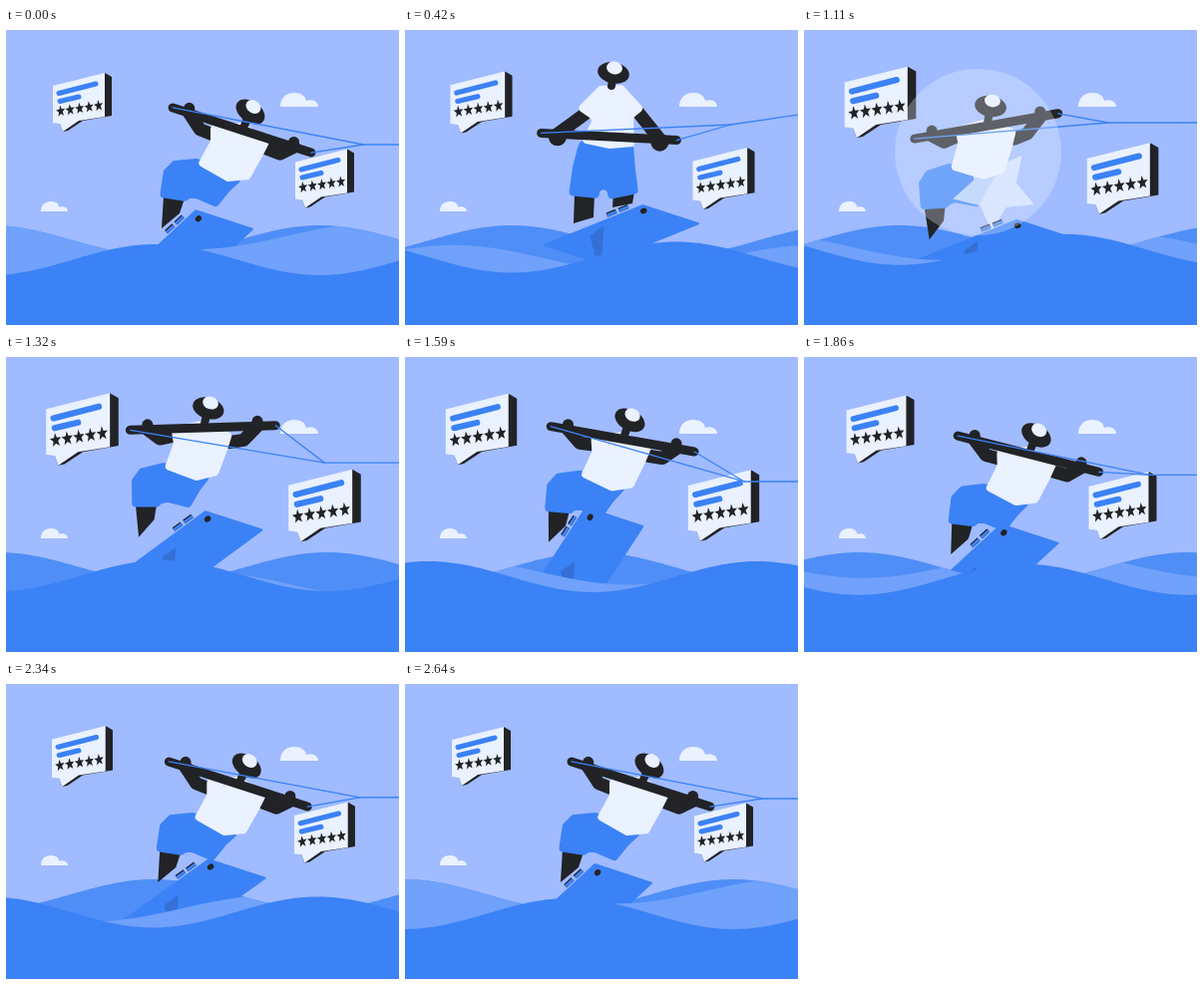
Write an HTML page with a canvas that moves like this. It is 394 px wide and 300 px high and loops after 2.67 s.

```html
<!DOCTYPE html>
<html lang="en">
<head>
<meta charset="utf-8">
<title>Wakeboarder</title>
<style>
html, body { margin: 0; width: 100%; height: 100%; overflow: hidden; background: #fff; }
canvas { display: block; width: 394px; height: 300px; }
</style>
</head>
<body>
<canvas id="stage"></canvas>
<script>
const LOOP = 2670, W = 394, H = 300, TAU = Math.PI * 2, RAD = Math.PI / 180;
const SKY = '#a0bbff', BLUE = '#3b82f6', MID = '#4f8ef7', LIGHT = '#70a1fb',
      FIN = '#3470d5', INK = '#222326', PALE = '#eaf1ff';
const canvas = document.getElementById('stage');
const ctx = canvas.getContext('2d');
const dpr = Math.max(1, window.devicePixelRatio || 1);
canvas.width = W * dpr;
canvas.height = H * dpr;

// The rider blends between two poses.
const STAND = {
  shirt: [195,58, 218,57, 240,81, 229,90, 230,119, 205,121, 176,115, 188,92, 172,81],
  shorts: [176,113, 229,118, 231,142, 234,166, 204,172, 199,143, 194,171, 164,168, 168,140, 173,120],
  legs: [170,166, 190,166, 189,190, 169,196, 209,164, 230,164, 228,176, 208,180],
  head: [209,45, 210,40, 207,58],
  bar: [204.5,109]
};
const CROUCH = {
  shirt: [208,97, 238,95, 265,113, 257,129, 244,152, 222,154, 192,137, 205,113, 205,99],
  shorts: [192,131, 238,151, 224,164, 211,180, 190,171, 184,171, 180,174, 154,170, 158,143, 168,133],
  legs: [158,168, 180,168, 174,186, 156,201, 190,158, 204,158, 204,168, 190,168],
  head: [245,84, 248,79, 239,98],
  bar: [236.5,102.5]
};
// time, drift, crouch, bar angle, board angle, nose x and y, rope height at the edge
const MOVES = [
  [0, 0, 1, 18, -43, 190, 182, 117],
  [420, 0, 0, 3, -22, 238, 177, 87],
  [870, -19, 0, 3, -20, 239, 184, 86],
  [1110, -45, 1, -10, -22, 258, 192, 95],
  [1590, -16, 1, 10, -57, 197, 169, 127],
  [2100, -6, 1, 18, -31, 217, 174, 115]
];

const mix = (a, b, u) => a + (b - a) * u;
const blend = (a, b, u) => a.map((v, i) => mix(v, b[i], u));

function moveAt(t) {
  let i = MOVES.length - 1;
  while (MOVES[i][0] > t) i--;
  const a = MOVES[i], b = MOVES[i + 1] || [LOOP, ...MOVES[0].slice(1)];
  const u = (t - a[0]) / (b[0] - a[0]);
  const [, drift, crouch, bar, tilt, noseX, noseY, rope] = blend(a, b, u * u * (3 - 2 * u));
  const h = Math.max(0, (t - 1110) / 990);
  const hop = h < 1 ? 256 * h * (1 - h) ** 3 : 0;
  const lean = (bar - mix(3, 18, crouch)) * .45;
  const c = Math.cos(lean * RAD), s = Math.sin(lean * RAD);
  // a posed part, turned about the waist and carried along
  const part = name => {
    const p = blend(STAND[name], CROUCH[name], crouch);
    return p.map((v, i) => i % 2
      ? 140 + (p[i - 1] - 215) * s + (v - 140) * c - hop
      : 215 + (v - 215) * c - (p[i + 1] - 140) * s + drift);
  };
  return { part, crouch, bar, lean, tilt, rope, nose: [noseX + drift, noseY - hop] };
}

function poly(p, fill, r = 0) {
  const n = p.length;
  ctx.beginPath();
  ctx.moveTo((p[0] + p[n - 2]) / 2, (p[1] + p[n - 1]) / 2);
  for (let i = 0; i < n; i += 2) ctx.arcTo(p[i], p[i + 1], p[(i + 2) % n], p[(i + 3) % n], r);
  ctx.closePath();
  ctx.fillStyle = fill;
  ctx.fill();
}

function line(p, color, width) {
  ctx.beginPath();
  for (let i = 0; i < p.length; i += 2) ctx.lineTo(p[i], p[i + 1]);
  ctx.strokeStyle = color;
  ctx.lineWidth = width;
  ctx.stroke();
}

function oval(x, y, rx, ry, deg, fill) {
  ctx.beginPath();
  ctx.ellipse(x, y, rx, ry, deg * RAD, 0, TAU);
  ctx.fillStyle = fill;
  ctx.fill();
}

function star(x, y, r, inner, deg, fill, squeeze = 1) {
  const p = [];
  for (let i = 0; i < 10; i++) {
    const a = deg * RAD + i * TAU / 10, q = i % 2 ? r * inner : r;
    p.push(x + q * squeeze * Math.cos(a), y + q * Math.sin(a));
  }
  poly(p, fill);
}

function cloud(x, y, s) {
  ctx.save();
  ctx.translate(x, y);
  ctx.scale(s, s);
  ctx.fillStyle = PALE;
  ctx.fill(new Path2D('M0 0C0-8 5-14 14-14C21-14 25-11 26-6C32-8 38-5 38 0Z'));
  ctx.restore();
}

function card(x, y, s) {
  ctx.save();
  ctx.translate(x, y);
  ctx.scale(s, s);
  ctx.translate(-76.5, -74.5);
  poly([99,45, 106,49, 106,88, 77,93, 62,103, 57,104, 54,96, 90,86], INK);
  poly([47,58, 99,45, 99,89, 73,93, 57,104, 54,96, 47,95], PALE);
  line([53,65.5, 90,56], BLUE, 5);
  line([54,73.5, 73,69], BLUE, 5);
  for (let i = 0; i < 5; i++) star(54.8 + i * 9.5, 83.5 - i * 1.4, 6, .42, -98, INK, .8);
  ctx.restore();
}

function sea(fn, fill) {
  const p = [0, 298];
  for (let x = 0; x <= W; x += 2) p.push(x, fn(x));
  p.push(W, 298);
  poly(p, fill);
}

function board(m) {
  const [x, y] = m.nose;
  const dx = -Math.cos(m.tilt * RAD), dy = -Math.sin(m.tilt * RAD);
  // along the rail from the nose, and across the deck
  const at = (along, across) => [x + dx * along + across * .95, y + dy * along + across * .31];
  poly([...at(0, 0), ...at(0, 62), ...at(109, 62), ...at(109, 0)], BLUE, 1);
  const [fx, fy] = at(72, 15);
  poly([fx, fy, fx + 14, fy - 10, fx + 12, fy + 20, fx + 5, fy + 20], FIN);
  ctx.lineCap = 'butt';
  for (const along of [19, 32]) {
    const [a, b] = [at(along - 5, 0), at(along + 5, 0)];
    const rail = [...a, ...b].map((v, i) => v + 3.5 * (i % 2 ? dx : -dy));
    line(rail, INK, 4.4);
    line(rail.map(v => v + .4), BLUE, 3);
  }
  ctx.lineCap = 'round';
  oval(...at(9, 10), 3.4, 2.8, m.tilt, INK);
}

function arm(m, sleeve, grip) {
  const [sx, sy] = sleeve, [hx, hy] = grip;
  line([sx, sy, (sx + hx) / 2, (sy + hy) / 2 + 6 * m.crouch, hx, hy], INK, 13);
  oval(hx, hy + mix(3, -5, m.crouch), mix(9, 5.5, m.crouch), mix(9, 5.5, m.crouch), 0, INK);
}

function upperBody(m) {
  const shirt = m.part('shirt');
  const [hx, hy, cx, cy, nx, ny] = m.part('head');
  const [bx, by] = m.part('bar');
  const half = mix(68, 73, m.crouch);
  const onBar = f => [bx + half * f * Math.cos(m.bar * RAD), by + half * f * Math.sin(m.bar * RAD)];
  const between = i => [(shirt[i] + shirt[i + 2]) / 2, (shirt[i + 1] + shirt[i + 3]) / 2];
  arm(m, between(14), onBar(-.76));
  arm(m, between(4), onBar(.75));
  poly(shirt, PALE, 4);
  const tilt = mix(12, 35, m.crouch) + m.lean * 2;
  line([hx, hy, nx, ny], INK, 8);
  oval(hx, hy, 16, 10.5, tilt, INK);
  oval(cx, cy, 8, 6.3, tilt, PALE);
  const a = onBar(-1), b = onBar(1);
  const knot = [bx + 122, m.rope + 10 * (1 - m.crouch)];
  line([...a, ...b], INK, 9);
  line([...a, ...knot], BLUE, 1.3);
  line([...b, ...knot, W + 1, m.rope], BLUE, 1.3);
}

const TRICKS = [[1110, 174.5, 22], [2100, 172.5, 8]];
const glow = (t, at) => Math.min(1, Math.max(0, (165 - Math.abs(t - at)) / 90));

function draw(t) {
  const w = t / LOOP * TAU, m = moveAt(t);
  const swell = x => Math.cos((x - 315) / 330 * TAU + 4 * w);
  const back = x => 213 - 15 * swell(x);
  const chop = x => 220 - 11 * Math.cos(3 * w)
    + 13 * Math.cos(x / 360 * TAU - .53 * TAU + 5 * w + .8 * Math.sin(w));

  ctx.setTransform(dpr, 0, 0, dpr, 0, 0);
  ctx.lineCap = ctx.lineJoin = 'round';
  ctx.fillStyle = '#fff';
  ctx.fillRect(0, 0, W, H);
  ctx.fillStyle = SKY;
  ctx.fillRect(0, 2, W, 296);
  cloud(275, 79, 1);
  cloud(35, 184, .71);
  const size = 1.115 - .115 * Math.cos(w);
  card(76.5, 74.5, size);
  card(319.5, 151, size);

  sea(back, MID);
  const legs = m.part('legs');
  poly(legs.slice(0, 8), INK);
  poly(legs.slice(8), INK);
  poly(m.part('shorts'), BLUE, 4);
  for (const [at, , deg] of TRICKS) {
    ctx.globalAlpha = .7 * glow(t, at);
    star(191, 161, 43, .52, deg, PALE);
  }
  ctx.globalAlpha = 1;
  board(m);
  sea(x => Math.max(back(x), chop(x)), LIGHT);
  sea(x => 227 + 5.5 * Math.cos(w) + 15.5 * swell(x), BLUE);
  upperBody(m);

  for (const [at, x] of TRICKS) {
    ctx.globalAlpha = .3 * glow(t, at);
    oval(x, 124.5, 83.5, 83.5, 0, PALE);
  }
  ctx.globalAlpha = 1;
}

function tick() {
  draw(performance.now() % LOOP);
  requestAnimationFrame(tick);
}
tick();
</script>
</body>
</html>
```
